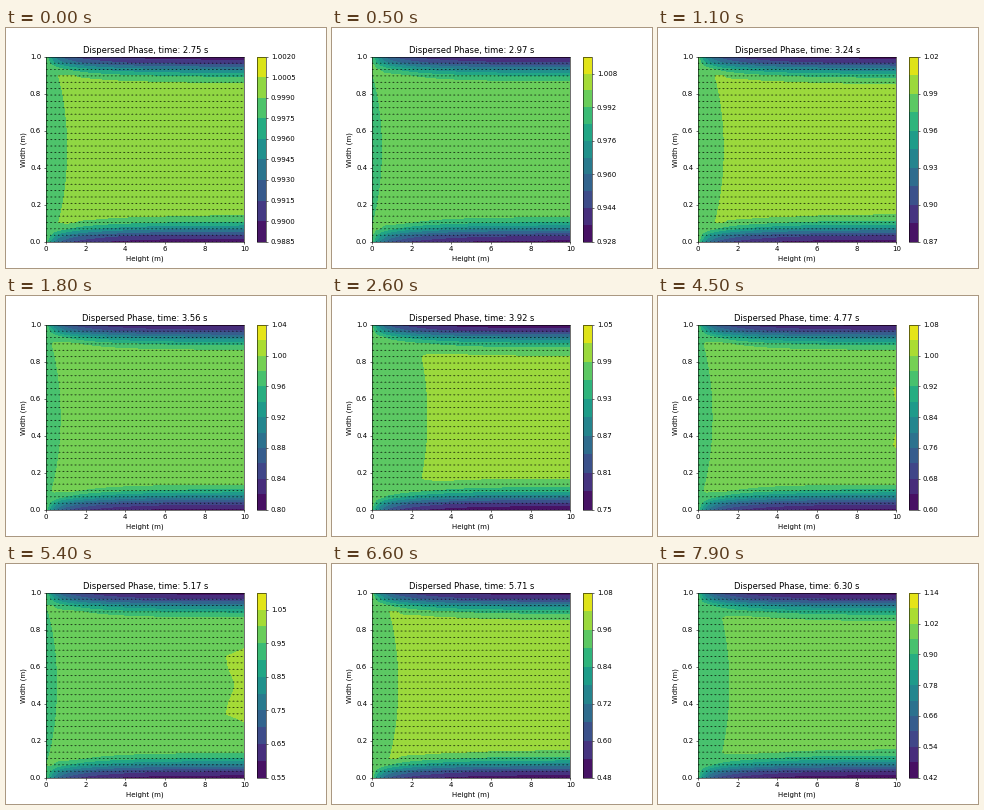
A matplotlib script that plays this animation: 320x240 px, repeating every 8 s.

```python
import numpy as np
import matplotlib.pyplot as plt
from matplotlib.animation import FuncAnimation
from matplotlib.ticker import MaxNLocator

FRAMES, INTERVAL = 80, 100
T0, DT = 2.75, 0.0449
OVERSHOOT = 0.155

x = np.linspace(0, 10, 50)
y = np.linspace(0, 1, 30)
X, Y = np.meshgrid(x, y)
R = np.abs(Y - 0.5)

# Deficit of the phase fraction at the wall over time
TIMES = [2.71, 2.75, 2.97, 3.56, 4.32, 5.17, 5.71, 6.0, 6.3]
DEPTHS = [0, 0.011, 0.066, 0.188, 0.312, 0.43, 0.498, 0.532, 0.563]


def deficit_shape():
    """Wall layers and inlet zone, scaled to 1 at the outlet wall."""
    dist = np.minimum(Y, 1 - Y)
    delta = 0.088 * (1 - 0.43 * np.exp(-X / 2.5))
    peak = 1 - 0.4 * np.exp(-X / 2) - 0.45 * np.exp(-X / 0.4)
    wall = peak * np.exp(-(dist / delta) ** 1.8)
    inlet = 0.15 * np.exp(-X / 2) * (1 - 1.3 * R**2)
    return np.maximum(wall, inlet)


SHAPE = deficit_shape()


def field(t, depth):
    front = 8.95 + 0.45 * np.exp(-((R / 0.08) ** 2))
    front += 40 * np.maximum(R - 0.17, 0) - 2 * (t - 5.17)
    bump = np.clip(0.01 * (X - front), -0.004, 0.01)
    return 1 + depth * (bump - SHAPE)


fig = plt.figure(figsize=(6.4, 4.8), dpi=50)
ax = fig.add_axes([0.125, 0.11, 0.62, 0.77])
ax.quiver(X, Y, 1 - 0.6 * (2 * R) ** 8, np.zeros_like(X),
          scale=75, width=0.0018, zorder=2)
ax.set(xlim=(0, 10), ylim=(0, 1), xlabel="Height (m)", ylabel="Width (m)")
title = ax.set_title("")
drawn = []


def update(i):
    while drawn:
        drawn.pop().remove()
    t = T0 + DT * i
    depth = np.interp(t, TIMES, DEPTHS)
    locator = MaxNLocator(11, min_n_ticks=1)
    levels = locator.tick_values(1 - depth, 1 + OVERSHOOT * depth)
    filled = ax.contourf(X, Y, field(t, depth), levels=levels, zorder=1)
    cax = fig.add_axes([0.78375, 0.11, 0.028875, 0.77])
    fig.colorbar(filled, cax=cax)
    title.set_text(f"Dispersed Phase, time: {t:.2f} s")
    drawn.extend([filled, cax])
    return []


anim = FuncAnimation(fig, update, frames=FRAMES, interval=INTERVAL,
                     init_func=lambda: [], repeat=True, repeat_delay=0)
plt.show()
```
